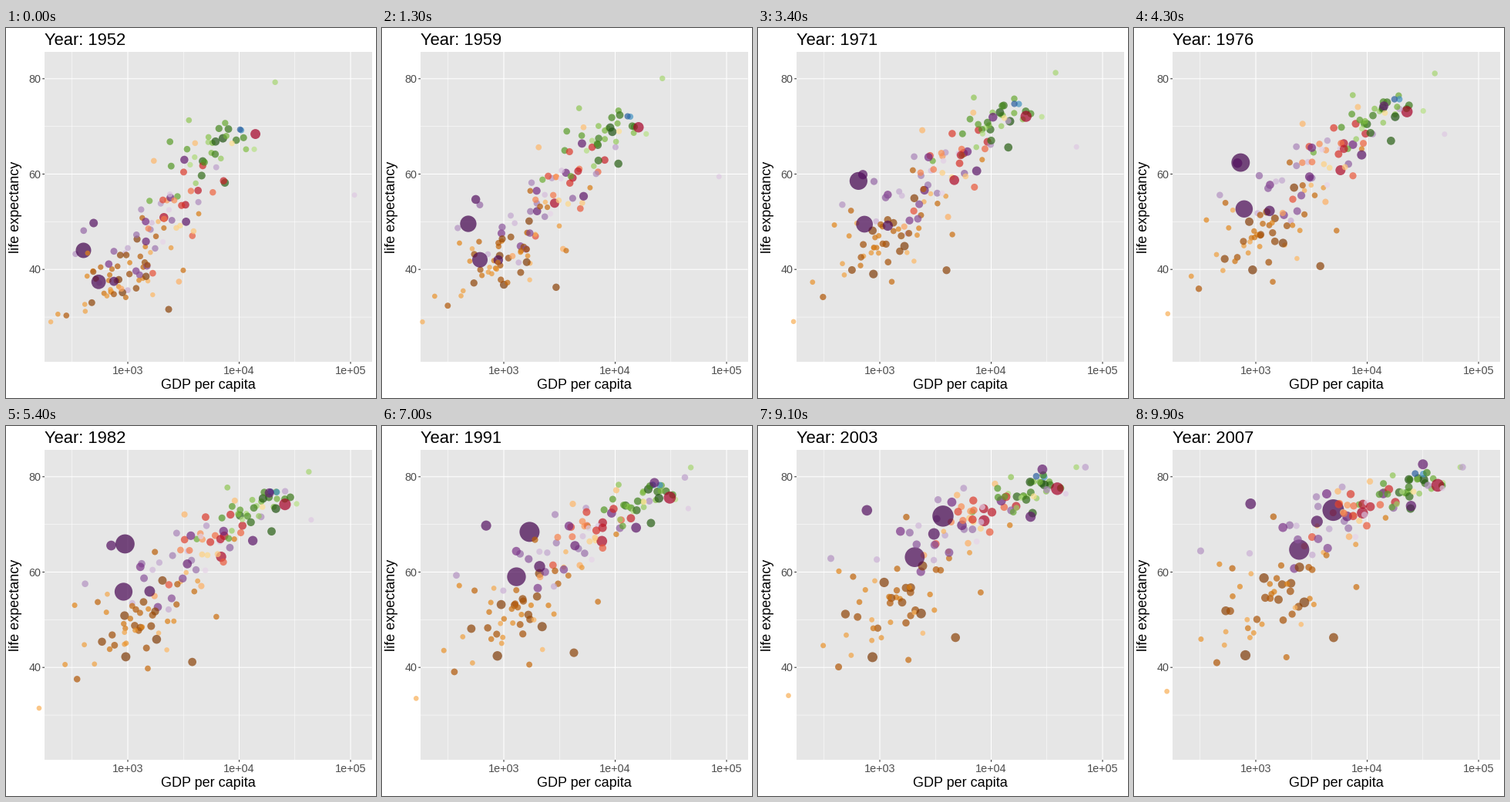
A matplotlib script for the animation above (10 s loop, 480x480 px).

```python
import numpy as np
import matplotlib.pyplot as plt
from matplotlib.animation import FuncAnimation
from matplotlib.colors import LinearSegmentedColormap
from matplotlib.patches import Rectangle

SIZE, DPI = 480, 100
FRAMES, INTERVAL = 100, 100
START, END = 1952, 2007
PT = 72 / DPI  # points per pixel
LEFT, TOP, RIGHT, BOTTOM = 50, 31, 474.5, 433

plt.rcParams["font.family"] = "Liberation Sans"
rng = np.random.default_rng(5)
t = np.linspace(0, 1, FRAMES)
years = START + (END - START) * t


def px(log_gdp):
    return 158 + 144.5 * (np.asarray(log_gdp) - 3)


def py(life):
    return 65.8 + 6.185 * (80 - np.asarray(life))


def over_time(values):
    """Values spread evenly over the whole period, joined by straight lines."""
    return np.interp(t, np.linspace(0, 1, len(values)), values)


def trend(start, end):
    """Fast growth at first, slower later."""
    return start + (end - start) * t ** 0.7


# Dot count, population of the largest (millions), its growth, colour ramp,
# and start and end of: log10 GDP, its spread, life expectancy, its spread.
GROUPS = {
    "Africa": (52, 135, 4, ["#7F3B08", "#B35806", "#E08214", "#FDB863"],
               (2.97, 3.17), (0.27, 0.38), (39.3, 54.5), (4.8, 7.5)),
    "Americas": (25, 110, 2.4,
                 ["#A50026", "#D73027", "#F46D43", "#FDAE61", "#FEE090"],
                 (3.47, 3.88), (0.22, 0.22), (53.5, 73.2), (8, 3.4)),
    "Asia": (33, 224, 2.5,
             ["#40004B", "#762A83", "#9970AB", "#C2A5CF", "#E7D4E8"],
             (3.15, 3.72), (0.28, 0.46), (47.5, 71.5), (7.5, 5.5)),
    "Europe": (30, 82, 1.3, ["#1F5211", "#4D9221", "#7FBC41", "#B8E186"],
               (3.72, 4.36), (0.26, 0.2), (65, 77.6), (4.8, 2.4)),
    "Oceania": (2, 20, 2.2, ["#2C5FA0", "#4393C3"],
                (4.01, 4.47), (0.01, 0.06), (69.3, 80.7), (0.1, 0.4)),
}

# The dots that stand out, by size rank: population, then start, middle and
# end as (GDP, life expectancy).
LEADERS = {
    ("Asia", 0): (1319, (400, 44), (800, 65.2), (4959, 73)),
    ("Asia", 1): (1110, (547, 37.4), (830, 55), (2452, 64.7)),
    ("Asia", 2): (224, (750, 37.5), (1450, 54.5), (3540, 70.6)),
    ("Asia", 5): (127, (3217, 63), (17700, 76), (31656, 82.6)),
    ("Asia", 30): (3, (108382, 55.6), (44000, 70.3), (47307, 77.6)),
    ("Americas", 0): (301, (13990, 68.4), (24500, 73.8), (42952, 78.2)),
    ("Americas", 1): (190, (2109, 50.9), (6700, 62.3), (9066, 72.4)),
    ("Europe", 0): (82, (7144, 67.5), (20500, 72.7), (32170, 79.4)),
}


def scores(n):
    """Bell-shaped scores with unit spread, in random order."""
    u = (np.arange(n) + 0.5) / n
    return rng.permutation(np.log(u / (1 - u)) / 1.8)


def wander(scale):
    """A small random walk with one step every five years."""
    walk = np.cumsum(rng.normal(0, scale, 12))
    return over_time(walk - walk.mean())


def group_dots(name, n, top, growth, ramp, gdp, gdp_sd, life, life_sd):
    ramp = LinearSegmentedColormap.from_list(name, ramp)
    zx = scores(n)
    zy = 0.6 * zx + 0.8 * scores(n)
    for rank in range(n):
        if (name, rank) in LEADERS:
            pop, *path = LEADERS[name, rank]
            x, y = np.transpose(path)
            x, y = over_time(np.log10(x)), over_time(y)
        else:
            pop = top * np.exp(-0.11 * rank)
            x = trend(*gdp) + zx[rank] * trend(*gdp_sd)
            y = trend(*life) + zy[rank] * trend(*life_sd)
            x = x + wander(0.12 * gdp_sd[0])
            y = np.clip(y + wander(0.12 * life_sd[1]), 29, 82)
        pop = pop * (1 + (growth - 1) * t) / growth
        radius = 3.1 + 10.9 * np.sqrt(pop / 1319)
        yield px(x), py(y), radius, ramp(rank / (n - 1))


dots = [d for name, spec in GROUPS.items() for d in group_dots(name, *spec)]
dots = [dots[i] for i in rng.permutation(len(dots))]
xs, ys, radii = (np.array([d[k] for d in dots]) for k in range(3))
areas = (2 * radii * PT) ** 2

fig = plt.figure(figsize=(SIZE / DPI, SIZE / DPI), dpi=DPI, facecolor="white")
ax = fig.add_axes([0, 0, 1, 1])
ax.set(xlim=(0, SIZE), ylim=(SIZE, 0))
ax.axis("off")
ax.add_patch(Rectangle((LEFT, TOP), RIGHT - LEFT, BOTTOM - TOP,
                       facecolor="#E6E6E6", linewidth=0, zorder=0))


def line(x, y, width, color="white"):
    ax.plot(x, y, color=color, linewidth=width * PT, zorder=1,
            solid_capstyle="butt", snap=False)


def label(x, y, text, size, **kw):
    return ax.text(x, y, text, fontsize=size * PT, **kw)


for v in (2.5, 3.5, 4.5):
    line([px(v)] * 2, [TOP, BOTTOM], 0.55)
for v in (30, 50, 70):
    line([LEFT, RIGHT], [py(v)] * 2, 0.55)

GRAY, TICK = "#4D4D4D", "#333333"
for v in (3, 4, 5):
    line([px(v)] * 2, [TOP, BOTTOM], 1.07)
    line([px(v)] * 2, [BOTTOM, BOTTOM + 2.75], 1.07, TICK)
    label(px(v), 449, f"1e+{v:02d}", 14.4, ha="center", color=GRAY)
for v in (40, 60, 80):
    line([LEFT, RIGHT], [py(v)] * 2, 1.07)
    line([LEFT - 2.75, LEFT], [py(v)] * 2, 1.07, TICK)
    label(45, py(v) + 5.2, str(v), 14.4, ha="right", color=GRAY)

label(262, 468, "GDP per capita", 18, ha="center")
label(13, 232, "life expectancy", 18, ha="center", va="center", rotation=90)
title = label(50, 22, "", 22)
points = ax.scatter(xs[:, 0], ys[:, 0], s=areas[:, 0], alpha=0.7,
                    c=[d[3] for d in dots], linewidths=0, zorder=3)


def update(i):
    points.set_offsets(np.column_stack([xs[:, i], ys[:, i]]))
    points.set_sizes(areas[:, i])
    title.set_text(f"Year: {round(years[i])}")
    return points, title


anim = FuncAnimation(fig, update, frames=FRAMES, interval=INTERVAL,
                     repeat=True, repeat_delay=0)
plt.show()
```
